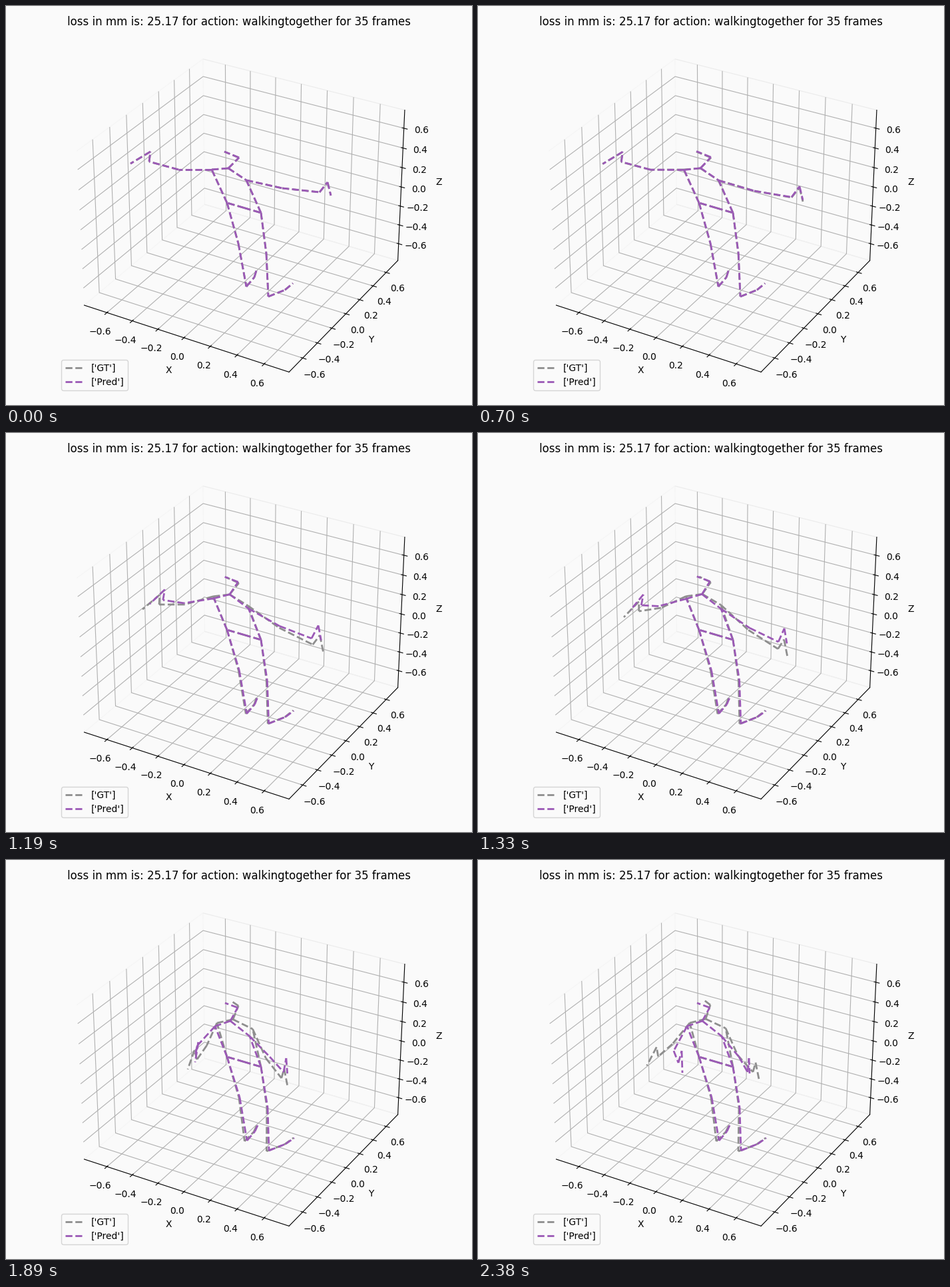
These frames come from a looping animation (700 px wide and 600 px high, 2450 ms). A matplotlib script:

```python
import numpy as np
import matplotlib.pyplot as plt
from matplotlib.animation import FuncAnimation
from matplotlib.lines import Line2D

W, H = 700, 600
BG = "#fafafa"
GRAY, PURPLE = "#8e8e8e", "#9b59b6"
FRAMES, STEP_MS = 35, 70

# Starting pose in stage pixels, each point as x + yj.
TRUNK = [334 + 244j, 350 + 228j, 328 + 219j, 309 + 246j, 361 + 262j]
LEFT_ARM = [259 + 246j, 215 + 234j, 217 + 219j, 187 + 237j]
RIGHT_ARM = [415 + 274j, 471 + 280j, 483 + 265j, 488 + 285j]
HIPS = [332 + 296j, 383 + 311j, 357.5 + 303.5j]
LEFT_LEG = [349 + 357j, 361 + 422j, 373 + 408j, 376 + 398j]
RIGHT_LEG = [391 + 372j, 394 + 437j, 419 + 427j, 431 + 417j]

# Joint order: trunk 0-4, left arm 5-8, right arm 9-12, hips 13-15, legs 16-23.
CHAINS = [
    (15, 13, 16, 17, 18, 19),
    (15, 14, 20, 21, 22, 23),
    (13, 3, 5, 6, 7, 8),
    (14, 4, 9, 10, 11, 12),
    (0, 3),
    (0, 4),
    (0, 1, 2),
]
BONES = [pair for chain in CHAINS for pair in zip(chain, chain[1:])]


def ease(start, end):
    """Smooth step from 0 to 1 between two moments, one value per frame."""
    u = np.clip((np.arange(FRAMES) - start) / (end - start), 0, 1)
    return (u * u * (3 - 2 * u))[:, None]


def move(points, shift, across, down):
    """Shift the points, with separate progress for x and y."""
    shift = np.array(shift)
    return np.array(points) + shift.real * across + 1j * shift.imag * down


def body(trunk, left, right, leg, drift):
    """Joint paths in figure fractions; each arm is (shift, across, down)."""
    joints = np.concatenate(
        [
            move(TRUNK, trunk, drift, drift),
            move(LEFT_ARM, *left),
            move(RIGHT_ARM, *right),
            np.tile(HIPS, (FRAMES, 1)),
            move(LEFT_LEG, leg, drift, drift),
            move(RIGHT_LEG, leg, drift, drift),
        ],
        axis=1,
    )
    return joints.real / W, 1 - joints.imag / H


# The true arms swing back a little at the end.
rebound = ease(27, 35)
truth = body(
    trunk=[8 - 5j, -1 - 10j, 12 - 8j, 9 - 1j, 11 - 9j],
    left=([45 + 34j, 76 + 68j, 70 + 69j, 91 + 80j],
          ease(12, 29.5) - 0.28 * rebound, ease(9, 29) - 0.1 * rebound),
    right=([-25 + 24j, -58 + 48j, -66 + 49j, -66 + 55j],
           ease(13, 28), ease(6, 21.5) - 0.2 * rebound),
    leg=[1, -3 + 1j, -1 + 1j, 1 + 1j],
    drift=ease(10, 32),
)
guess = body(
    trunk=[3 - 2j, -2 - 6j, 1 - 4j, 5 + 4j, 5 + 3j],
    left=([35 + 41j, 86 + 71j, 89 + 68j, 120 + 83j], ease(9, 34), ease(9, 34)),
    right=([-23 + 22j, -66 + 39j, -76 + 33j, -80 + 36j], ease(11, 33), ease(5, 23)),
    leg=[2, 1, 1, 2 + 1j],
    drift=ease(6, 24),
)


def skeleton(color, label):
    style = dict(color=color, lw=2, ls="--", label=label)
    return [fig.add_artist(Line2D([], [], **style)) for _ in BONES]


fig = plt.figure(figsize=(W / 100, H / 100), dpi=100, facecolor=BG)
side = 547.67
ax = fig.add_axes(
    [(W - side) / 2 / W, 15 / H, side / W, side / H], projection="3d", facecolor=BG
)
limit = 0.75 * 25 / 24
ticks = np.round(np.linspace(-0.6, 0.6, 7), 1)
ax.set(
    xlim=(-limit, limit), ylim=(-limit, limit), zlim=(-limit, limit),
    xticks=ticks, yticks=ticks, zticks=ticks,
    xlabel="X", ylabel="Y", zlabel="Z",
)
ax.set_title("loss in mm is: 25.17 for action: walkingtogether for 35 frames", y=1)
ax.title.set_y(1)  # 3D axes lower the title, so put it back on the top edge
for axis, edge in zip((ax.xaxis, ax.yaxis, ax.zaxis), ("#f5f5f5", "#ebebeb", "#f0f0f0")):
    axis.pane.set(fill=False, edgecolor=edge, alpha=1, linewidth=0.8)

bodies = [(skeleton(GRAY, "['GT']"), truth), (skeleton(PURPLE, "['Pred']"), guess)]
ax.legend(handles=[lines[0] for lines, _ in bodies], loc="lower left", facecolor=BG)


def draw(i):
    for lines, (x, y) in bodies:
        for line, (a, b) in zip(lines, BONES):
            line.set_data(x[i, [a, b]], y[i, [a, b]])
    return [line for lines, _ in bodies for line in lines]


anim = FuncAnimation(fig, draw, frames=FRAMES, interval=STEP_MS, repeat=True)
plt.show()
```
